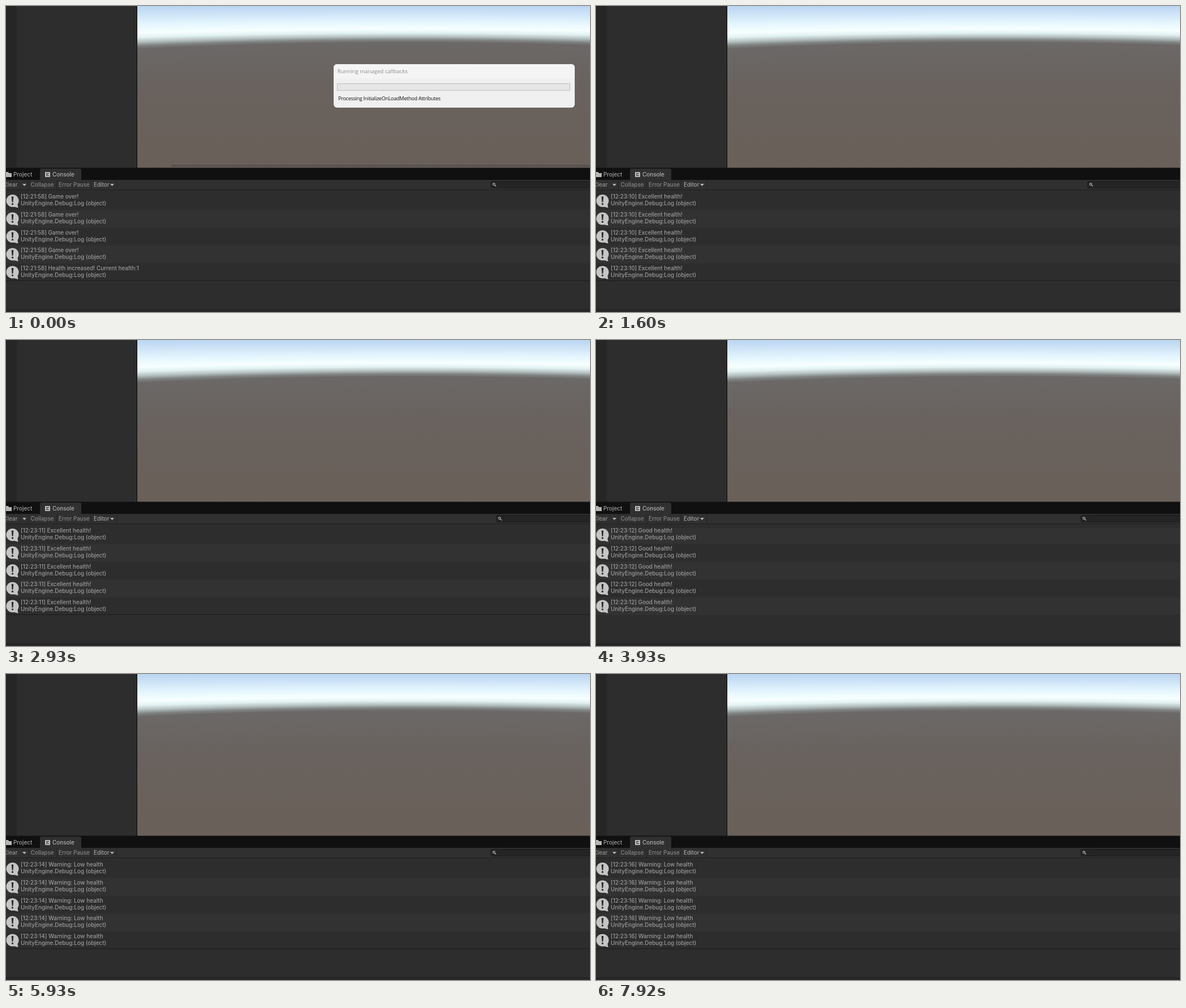
Animation, 1032 px wide and 542 px high, one loop 8000 ms. Source, as an HTML page with a canvas:

```html
<!DOCTYPE html>
<html lang="en">
<head>
<meta charset="utf-8">
<title>Editor console</title>
<style>
  html, body { margin: 0; width: 100%; height: 100%; overflow: hidden; background: #2d2d2d; }
  canvas { display: block; width: 1032px; height: 542px; }
</style>
</head>
<body>
<canvas id="stage" width="1032" height="542"></canvas>
<script>
const ctx = document.getElementById('stage').getContext('2d');
const LOOP = 8000;
const ROW = 31.6;
const UI = '500 9.9px Inter, sans-serif';

// Moments when the alternating row shades swap.
const FLIPS = [1740, 1940, 2340, 2540, 2730, 2930, 3130, 3330, 3530, 3740, 3930,
  4130, 4330, 4530, 5130, 5530, 5730, 5930, 6730, 6930];
// [start, value] steps
const SECONDS = [[1540, 10], [2140, 11], [3130, 12], [4130, 13], [5130, 14], [6130, 15], [7120, 16]];
const MESSAGES = [[1540, 'Excellent health!'], [3740, 'Good health!'], [5930, 'Warning: Low health']];
const SEARCH_X = [[0, 856], [1540, 868], [2730, 866], [3330, 856]];

const at = (steps, t) => steps.filter(([start]) => start <= t).pop()[1];

function rect(x, y, w, h, color, radius = 0) {
  ctx.fillStyle = color;
  ctx.beginPath();
  ctx.roundRect(x, y, w, h, radius);
  ctx.fill();
}

function text(str, x, y, color, font = UI, align = 'left') {
  ctx.font = font;
  ctx.fillStyle = color;
  ctx.textAlign = align;
  ctx.fillText(str, x, y);
}

function poly(points, color) {
  ctx.fillStyle = color;
  ctx.beginPath();
  points.forEach(([x, y]) => ctx.lineTo(x, y));
  ctx.fill();
}

const arrow = (x, y) => poly([[x, y], [x + 7, y], [x + 3.5, y + 4]], '#b4b4b4');

// The sky and ground never change, so they are painted once.
const scene = document.createElement('canvas');
scene.width = 800;
scene.height = 287;
(function paintScene() {
  const g = scene.getContext('2d');
  const sky = [[0, '#bad5f1'], [.22, '#cfe4f7'], [.45, '#e4f6fe'], [.66, '#f7ffff'],
    [.77, '#e2f1f2'], [.88, '#b3bebe'], [.97, '#7f8382'], [1.05, '#6b6867']];
  for (let x = 0; x < 800; x++) {
    const horizon = 62 + 10.5 * ((x - 478) / 478) ** 2;
    const column = g.createLinearGradient(0, 0, 0, 287);
    sky.forEach(([p, color]) => column.addColorStop(p * horizon / 287, color));
    column.addColorStop(.5, '#69625e');
    column.addColorStop(1, '#6a6059');
    g.fillStyle = column;
    g.fillRect(x, 0, 1, 287);
  }
})();

function drawPanels(t) {
  rect(0, 0, 1032, 542, '#2d2d2d');
  rect(0, 0, 19, 287, '#262626');
  rect(231, 0, 1, 287, '#080808');
  ctx.drawImage(scene, 232, 0);
  if (t < 1540) rect(292, 281, 750, 4, '#575350', 2);

  rect(0, 286.5, 1032, 21.5, '#101010');
  rect(60, 288, 73, 24, '#303030', [3, 3, 0, 0]);
  poly([[0, 294], [4, 294], [5, 296], [10, 296], [10, 303], [0, 303]], '#b5b5b5');
  text('Project', 13, 302, '#a0a0a0');
  rect(69, 294, 9, 9, '#bcbcbc', 1);
  for (let y = 296; y < 302; y += 2) rect(71, y, y === 298 ? 3 : 5, 1, '#303030');
  text('Console', 82, 302, '#b2b2b2');

  rect(0, 308, 1032, 17, '#303030');
  rect(0, 325, 1032, 1, '#1f1f1f');
  [39, 89, 150, 195].forEach(x => rect(x, 308, 1, 17, '#242424'));
  text('Clear', 20.5, 320, '#929292', UI, 'right');
  arrow(29, 315);
  text('Collapse', 43.5, 320, '#858585');
  text('Error Pause', 93, 320, '#858585');
  text('Editor', 155, 320, '#a2a2a2');
  arrow(184, 315);

  const x = at(SEARCH_X, t);
  rect(x, 310, 200, 13, '#1b1b1b', 4);
  rect(x + .7, 311, 200, 11.3, '#242424', 3.5);
  if (t >= 3740) rect(880, 310, 152, 1, '#121212');
  ctx.strokeStyle = '#b4b4b4';
  ctx.lineWidth = 1.2;
  ctx.beginPath();
  ctx.arc(x + 6.2, 315.7, 1.8, 0, Math.PI * 2);
  ctx.moveTo(x + 7.5, 317);
  ctx.lineTo(x + 10, 319.5);
  ctx.stroke();
}

function drawIcon(y) {
  poly([[12, y + 10], [20, y + 4], [21.5, y + 12.5]], '#c5c5c5');
  rect(.5, y - 11, 22, 22, '#c5c5c5', 11);
  poly([[9.7, y - 7.5], [13.3, y - 7.5], [12.5, y + 2.5], [10.5, y + 2.5]], '#2c2c2c');
  rect(9.8, y + 4, 3.4, 3.4, '#2c2c2c', 1.7);
}

function drawLog(t) {
  const light = FLIPS.filter(flip => flip <= t).length % 2;
  for (let i = 0; i < 5; i++) {
    const top = Math.round(329.3 + i * ROW);
    const start = Math.max(333, top);
    const end = Math.min(487, Math.round(329.3 + (i + 1) * ROW));
    rect(0, start, 1032, end - start, (i + light) % 2 ? '#323232' : '#2d2d2d');

    const y = i * ROW;
    drawIcon(345 + y);
    let line = '[12:21:58] ' + (i < 4 ? 'Game over!' : 'Health increased! Current health:1');
    if (t >= 1540) line = `[12:23:${at(SECONDS, t)}] ${at(MESSAGES, t)}`;
    text(line, 26, 341.3 + y, '#9b9b9b');
    text('UnityEngine.Debug:Log (object)', 26, 353.3 + y, '#9b9b9b');
  }
  if (!light && (t < 7120 || t >= 7920)) rect(0, 486, 1032, 1, '#1c1c1c');
  rect(0, 537, 1032, 2, '#242424');
  rect(0, 539, 1032, 3, '#2a2828');
}

function drawDialog(t) {
  const [title, detail] = t < 70
    ? ['Running managed callbacks', 'Processing InitializeOnLoadMethod Attributes']
    : ['Entering Playmode', 'Reloading Scene'];
  rect(579, 103, 426, 77, '#f0f0f0', 6);
  rect(579, 103, 426, 25, '#f4f4f4', [6, 6, 0, 0]);
  text(title, 585.5, 119, '#8b8b8b', '9.6px "Open Sans", sans-serif');
  rect(585, 137, 412, 13, '#bcbcbc');
  rect(586, 138, 410, 11, '#e6e6e6');
  ctx.letterSpacing = '-0.25px';
  text(detail, 587, 167, '#101010', '9px "Open Sans", sans-serif');
  ctx.letterSpacing = '0px';
}

function frame() {
  const t = performance.now() % LOOP;
  drawPanels(t);
  drawLog(t);
  if (t < 670) drawDialog(t);
  requestAnimationFrame(frame);
}
frame();
</script>
</body>
</html>
```
